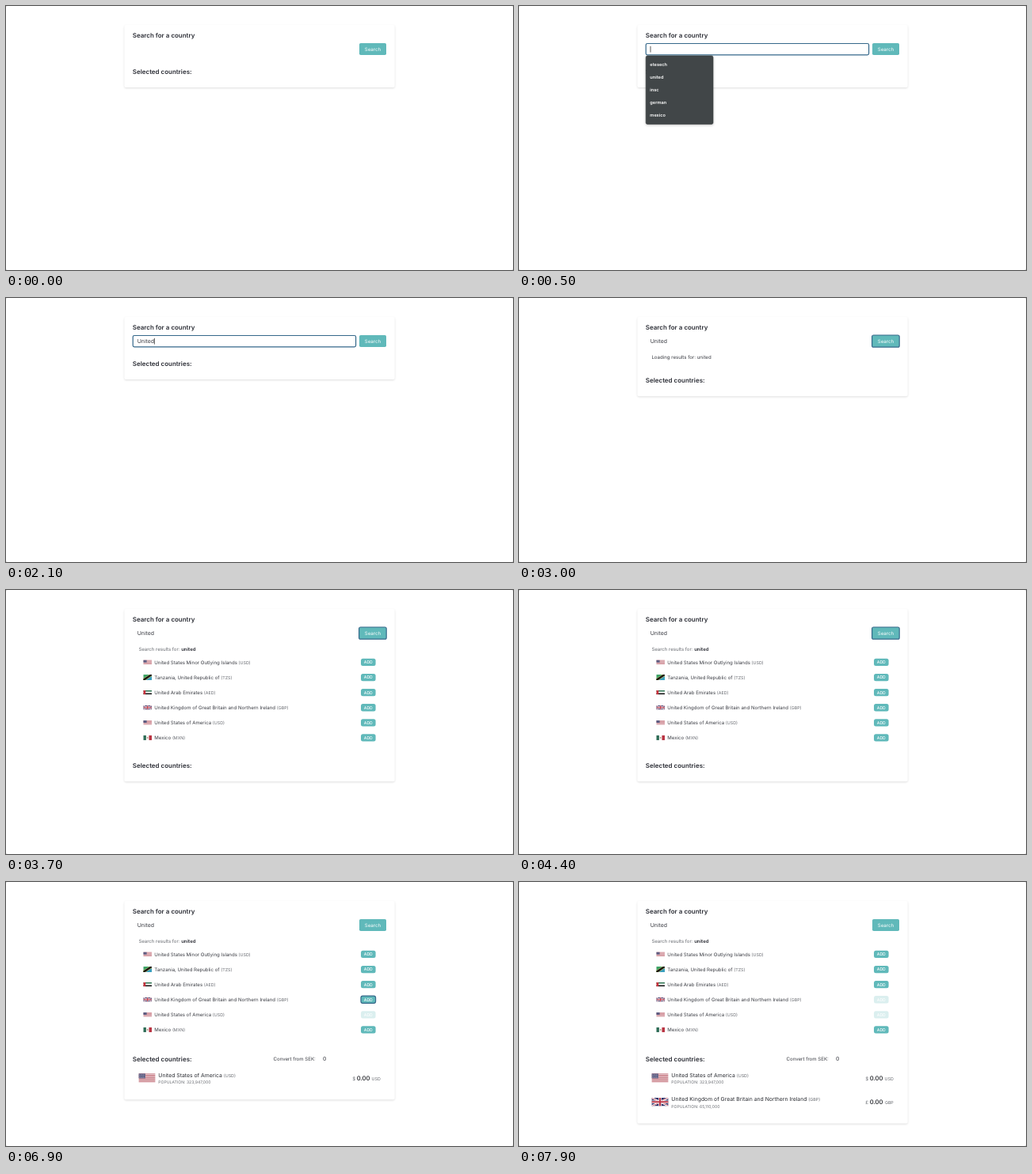
Write an HTML page that moves like this. It is 640x334 px and loops after 8000 ms.

```html
<!DOCTYPE html>
<html lang="en">
<head>
<meta charset="utf-8">
<title>Country search</title>
<style>
  html, body { margin: 0; width: 100%; height: 100%; overflow: hidden; background: #fff; }
  svg { display: block; width: 100vw; height: 100vh; }
  text { font-family: Inter, "Open Sans", sans-serif; font-size: 6.1px; fill: #3a3c43;
         text-rendering: geometricPrecision; white-space: pre; }
  .head { font-size: 7.97px; font-weight: 600; fill: #2c2e36; }
  .field { font-size: 6.9px; }
  .note { font-size: 6.02px; fill: #686b71; }
  .strong { font-weight: 600; fill: #2c2e36; }
  .code { font-size: 5.35px; fill: #63666c; }
  .population { font-size: 5.13px; fill: #686b71; }
  .country { font-size: 6.84px; fill: #2a2c32; }
  .amount { font-size: 7.7px; font-weight: 500; fill: #222429; }
  .option { font-size: 5.65px; font-weight: 600; fill: #fff; }
  .label { fill: #fff; text-anchor: middle; }
  .small { font-size: 5.2px; font-weight: 500; }
  .button { fill: #60b9ba; }
  .ring { fill: none; stroke: #35688a; stroke-width: 1.2; }
  #card { fill: #fff; filter: drop-shadow(0 1.3px 1.1px rgba(0,0,0,.13)); }
  #menu rect { fill: #414648; stroke: #35393b; stroke-width: .6;
               filter: drop-shadow(0 1px 1.5px rgba(0,0,0,.25)); }
</style>
</head>
<body>
<svg id="stage" viewBox="0 0 640 334" preserveAspectRatio="none">
  <defs id="flags"></defs>
  <rect width="640" height="334" fill="#d4d4d4"/>
  <rect width="640" height="334" rx="2" fill="#fff"/>
  <rect id="card" x="149.4" y="24" width="341.3" rx="2"/>

  <text class="head" x="159.8" y="40.4">Search for a country</text>
  <rect class="button" x="446" y="47" width="34" height="15" rx="1.8"/>
  <text class="label" x="462.9" y="57.1">Search</text>
  <rect id="searchRing" class="ring" x="445.6" y="47" width="34.6" height="15.2" rx="2"/>

  <text id="heading" class="head" x="159.8">Selected countries:</text>
  <text id="loading" x="167.4" y="76.9">Loading results for: united</text>
  <g id="results"></g>
  <g id="convert">
    <text x="337.6" y="226.2">Convert from SEK:</text>
    <text class="field" x="400" y="226.4">0</text>
  </g>
  <g id="selected"></g>

  <rect id="inputRing" class="ring" x="160.2" y="47.5" width="281.4" height="14.4" rx="1.8"/>
  <text id="query" class="field" x="165.7" y="57.3"></text>
  <rect id="caret" y="50.8" width=".8" height="7.8" fill="#333"/>
  <g id="menu"></g>
</svg>
<script>
const $ = id => document.getElementById(id);
const LOOP = 8000;

const rect = (x, y, w, h, fill) =>
  `<rect x="${x}" y="${y}" width="${w}" height="${h}" fill="${fill}"/>`;
const line = (d, color, width) =>
  `<path d="${d}" fill="none" stroke="${color}" stroke-width="${width}"/>`;
const range = n => [...Array(n).keys()];

// Each flag: width and height of its own grid, and its shapes
const flags = {
  us: [38, 20,
    rect(0, 0, 38, 20, "#f6f0f0") +
    range(7).map(i => rect(0, i * 40 / 13, 38, 20 / 13, "#b8505e")).join("") +
    rect(0, 0, 15.2, 140 / 13, "#4a4a74") +
    range(9).map(r => range(r % 2 ? 5 : 6).map(c =>
      `<circle cx="${1.27 * (2 * c + 1 + r % 2)}" cy="${1.08 * (r + 1)}" r=".45" fill="#fff"/>`
    ).join("")).join("")],
  tz: [36, 24,
    rect(0, 0, 36, 24, "#3fa468") +
    `<path d="M36 0V24H0Z" fill="#3a9fbe"/>` +
    line("M-3 26L39 -2", "#d8c860", 11) + line("M-3 26L39 -2", "#151515", 8)],
  ae: [24, 12,
    rect(0, 0, 24, 4, "#2c7350") + rect(0, 4, 24, 4, "#fff") +
    rect(0, 8, 24, 4, "#151515") + rect(0, 0, 6.4, 12, "#c5303c")],
  gb: [60, 30,
    rect(0, 0, 60, 30, "#2b3068") +
    line("M0 0L60 30M60 0L0 30", "#fff", 6) +
    line("M0 1L30 16M60 29L30 14M60 -1L30 14M0 31L30 16", "#bd3a4a", 2) +
    line("M30 0V30M0 15H60", "#fff", 10) +
    line("M30 0V30M0 15H60", "#bd3a4a", 6)],
  mx: [28, 16,
    rect(0, 0, 28, 16, "#fff") + rect(0, 0, 9.33, 16, "#2c6b55") +
    rect(18.67, 0, 9.33, 16, "#b93443") +
    `<circle cx="14" cy="8" r="2.4" fill="#a58a6c"/>`]
};

$("flags").innerHTML = Object.entries(flags).map(([id, [w, h, art]]) =>
  `<symbol id="${id}" viewBox="0 0 ${w} ${h}">${art}</symbol>`).join("");

function flag(id, x, cy, width) {
  const [w, h] = flags[id], height = width * h / w;
  return `<use href="#${id}" x="${x}" y="${cy - height / 2}" width="${width}" height="${height}"/>`;
}

const countries = [
  ["us", "United States Minor Outlying Islands", "USD"],
  ["tz", "Tanzania, United Republic of", "TZS"],
  ["ae", "United Arab Emirates", "AED"],
  ["gb", "United Kingdom of Great Britain and Northern Ireland", "GBP"],
  ["us", "United States of America", "USD"],
  ["mx", "Mexico", "MXN"]
];

const named = (name, code) => `${name} <tspan class="code">(${code})</tspan>`;

function resultRow([id, name, code], i) {
  const y = 91.4 + 19.1 * i;
  return flag(id, 173.3, y, 10.7) +
    `<text x="187.3" y="${y + 2.3}">${named(name, code)}</text>
    <g id="add${i}">
      <rect class="button" x="448" y="${y - 4.6}" width="18.6" height="9.3" rx="2.5"/>
      <text class="label small" x="457.3" y="${y + 1.9}">ADD</text>
    </g>
    <rect id="ring${i}" class="ring" x="448" y="${y - 4.6}" width="18.6" height="9.3" rx="2.3"/>`;
}

$("results").innerHTML =
  `<text class="note" x="167.4" y="76.9">Search results for: <tspan class="strong">united</tspan></text>` +
  countries.map(resultRow).join("");

function selectedRow([id, name, code], i, population, sign) {
  const y = 248 + 30.3 * i;
  return `<g id="pick${i}">${flag(id, 167.4, y - .1, 21.2)}
    <text class="country" x="192.3" y="${y - 1.4}">${named(name, code)}</text>
    <text class="population" x="192.3" y="${y + 7.2}">POPULATION: ${population}</text>
    <text class="note" x="437.3" y="${y + 2.6}">${sign}</text>
    <text class="amount" x="442.7" y="${y + 2.8}">0.00</text>
    <text class="code" x="472.8" y="${y + 2.6}" text-anchor="end">${code}</text></g>`;
}

$("selected").innerHTML =
  selectedRow(countries[4], 0, "323,947,000", "$") +
  selectedRow(countries[3], 1, "65,110,000", "£");

$("menu").innerHTML = `<rect id="menuBox" x="160.2" y="63" width="84.8" rx="2"/>` +
  ["etesech", "united", "insc", "german", "mexico"].map((word, i) =>
    `<text id="option${i}" class="option" x="165.3" y="${76.2 + 16 * i}">${word}</text>`).join("") +
  `<text id="match" class="option" x="165.3" y="76.2">united</text>`;

const show = (id, on) => $(id).setAttribute("visibility", on ? "visible" : "hidden");
const set = (id, name, value) => $(id).setAttribute(name, value);
const within = (t, from, to) => t >= from && t < to;

const keyTimes = [1300, 1500, 1700, 1800, 1900, 2100];

// Layout per phase: start, card bottom, heading baseline
const layouts = [
  [0, 103, 85.7],
  [3000, 124.2, 106.7],
  [3700, 242.2, 224.8],
  [6000, 275.3, 226.7],
  [7000, 305.6, 226.7]
];

function draw(t) {
  const [, bottom, baseline] = layouts.filter(l => t >= l[0]).pop();
  set("card", "height", bottom - 24);
  set("heading", "y", baseline);

  const typed = "United".slice(0, keyTimes.filter(k => t >= k).length);
  $("query").textContent = typed;
  const width = typed ? $("query").getComputedTextLength() : 0;
  set("caret", "x", 165.6 + width);
  show("caret", within(t, 500, 1000) || within(t, 1300, 2600));
  show("inputRing", within(t, 500, 3000));
  show("searchRing", within(t, 3000, 5900));

  const full = within(t, 500, 1300), matched = within(t, 1300, 2100);
  show("menuBox", full || matched);
  set("menuBox", "height", full ? 86.5 : 22.5);
  range(5).forEach(i => show("option" + i, full));
  show("match", matched);

  show("loading", within(t, 3000, 3700));
  show("results", t >= 3700);
  countries.forEach((_, i) => show("ring" + i,
    i === 4 && within(t, 5900, 6000) || i === 3 && within(t, 6900, 7000)));
  set("add4", "opacity", t >= 6000 ? .22 : 1);
  set("add3", "opacity", t >= 7000 ? .22 : 1);

  show("convert", t >= 6000);
  show("pick0", t >= 6000);
  show("pick1", t >= 7000);
}

const start = performance.now();
function tick() {
  draw((performance.now() - start) % LOOP);
  requestAnimationFrame(tick);
}
tick();
</script>
</body>
</html>
```
